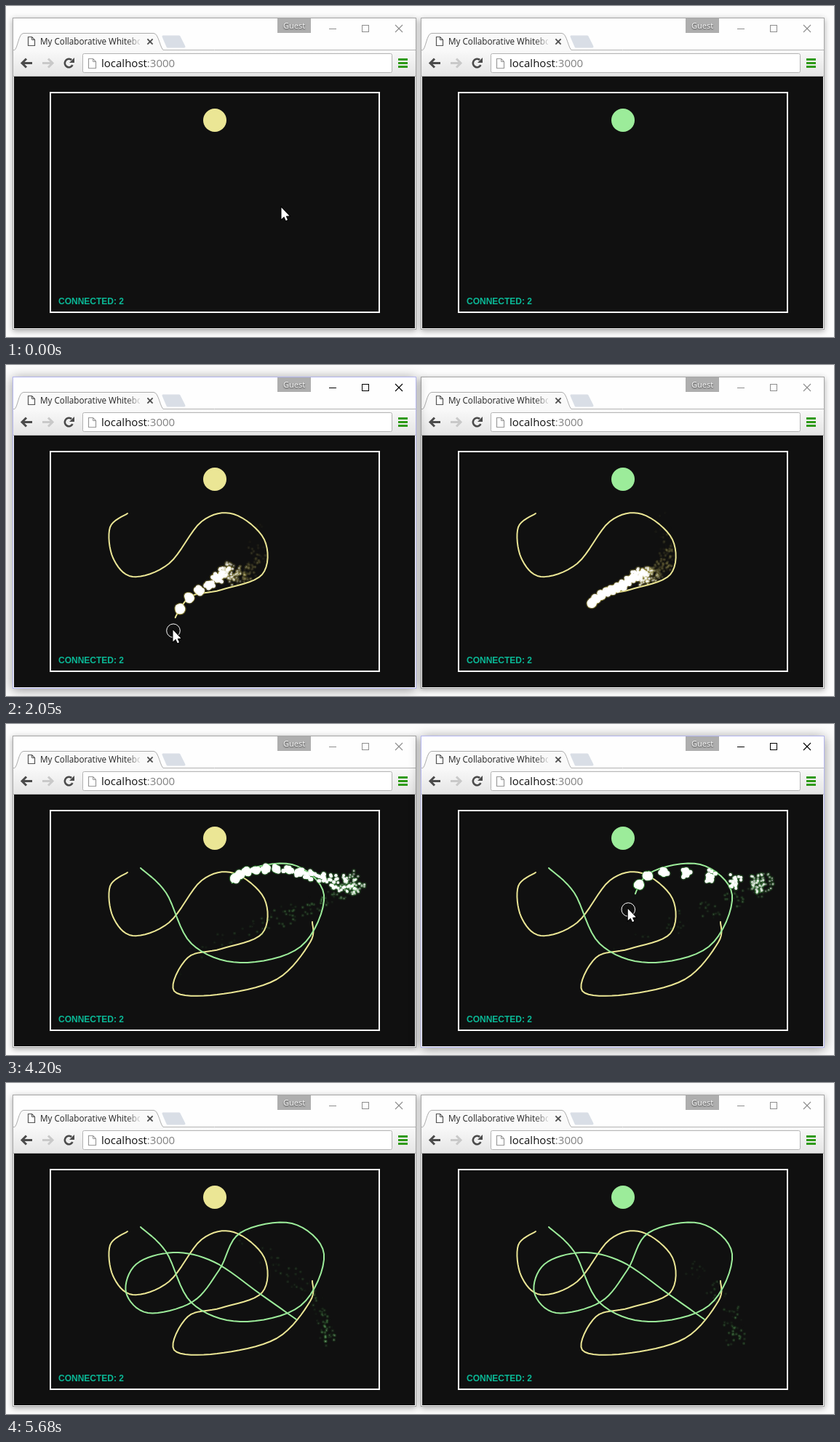
An HTML page with a canvas for the animation above (5.78 s loop, 1138 px wide and 455 px high).

```html
<!DOCTYPE html>
<html lang="en">
<head>
<meta charset="utf-8">
<title>Collaborative whiteboard</title>
<style>
html, body { margin: 0; width: 100%; height: 100%; overflow: hidden; background: #fcfcfc; }
canvas { display: block; }
</style>
</head>
<body>
<canvas id="stage" width="1138" height="455"></canvas>
<script>
const ctx = document.getElementById('stage').getContext('2d');
const LOOP = 5780, SHIFT = 561, TAU = Math.PI * 2;
const UI_FONT = '"Open Sans", "Noto Sans", sans-serif';

const clamp = (v, lo, hi) => Math.min(hi, Math.max(lo, v));
const mix = (a, b, k) => a + (b - a) * k;
const ease = k => k * k * (3 - 2 * k);

// The pointer passes one knot of the spline per beat (ms).
const strokes = [
  {
    owner: 0, color: '#ebe695', glow: '#b9ad4a',
    start: 640, beat: 129, wind: -20, reach: 38,
    knots: [[167, 204], [143, 223], [147, 265], [174, 291], [224, 273], [269, 215], [313, 205],
      [355, 240], [352, 288], [296, 309], [250, 321], [231, 367], [290, 372], [372, 351],
      [418, 300], [421, 272]]
  },
  {
    owner: 1, color: '#9cec9a', glow: '#43a443',
    start: 3190, beat: 127, wind: -10, reach: 50,
    knots: [[185, 198], [220, 232], [255, 302], [322, 328], [405, 306], [437, 235], [393, 193],
      [322, 206], [293, 257], [256, 301], [195, 316], [165, 288], [179, 249], [230, 233],
      [286, 246], [348, 289], [399, 325]]
  }
];
for (const s of strokes) {
  s.last = s.knots.length - 1;
  s.end = s.start + s.last * s.beat;
}

const progress = (s, t) => clamp((t - s.start) / s.beat, 0, s.last);

// Catmull-Rom spline through the knots.
function pointAt(s, u) {
  const i = Math.min(Math.floor(u), s.last - 1), k = u - i;
  const [a, b, c, d] = [-1, 0, 1, 2].map(n => s.knots[clamp(i + n, 0, s.last)]);
  return [0, 1].map(n => b[n] + 0.5 * k * (c[n] - a[n] +
    k * (2 * a[n] - 5 * b[n] + 4 * c[n] - d[n] + k * (3 * (b[n] - c[n]) + d[n] - a[n]))));
}

function rand(seed) {
  const v = Math.sin(seed * 12.9898 + 4.137) * 43758.5453;
  return v - Math.floor(v);
}

function path(points, close) {
  ctx.beginPath();
  points.forEach(([x, y], i) => i ? ctx.lineTo(x, y) : ctx.moveTo(x, y));
  if (close) ctx.closePath();
}

function outline(color, width, fill) {
  if (fill) {
    ctx.fillStyle = fill;
    ctx.fill();
  }
  ctx.strokeStyle = color;
  ctx.lineWidth = width;
  ctx.stroke();
}

function line(points, color, width) {
  path(points);
  outline(color, width);
}

function rect(x, y, w, h, color) {
  ctx.fillStyle = color;
  ctx.fillRect(x, y, w, h);
}

function disc(x, y, r, color) {
  ctx.beginPath();
  ctx.arc(x, y, r, 0, TAU);
  ctx.fillStyle = color;
  ctx.fill();
}

function text(str, x, y, font, color) {
  ctx.font = font;
  ctx.fillStyle = color;
  ctx.fillText(str, x, y);
}

function shadow(color, blur, dy) {
  ctx.shadowColor = color;
  ctx.shadowBlur = blur;
  ctx.shadowOffsetY = dy;
}
const noShadow = () => shadow('transparent', 0, 0);

function cross(x, y, r, color, width) {
  line([[x - r, y - r], [x + r, y + r]], color, width);
  line([[x + r, y - r], [x - r, y + r]], color, width);
}

function pageIcon(x, y, w, h, color) {
  const f = 4;
  path([[x, y], [x + w - f, y], [x + w, y + f], [x + w, y + h], [x, y + h]], true);
  outline(color, 1.2, '#fff');
  line([[x + w - f, y], [x + w - f, y + f], [x + w, y + f]], color, 1);
}

function navArrow(x, y, dir, color) {
  line([[x - 6 * dir, y], [x + 8 * dir, y]], color, 3);
  line([[x, y - 6], [x - 6 * dir, y], [x, y + 6]], color, 3);
}

function titleBar(active) {
  const ink = active ? '#000' : '#8e8e8e';
  rect(373, 17, 46, 20, '#aeaeae');
  shadow('rgba(0,0,0,.75)', 2, 1);
  text('Guest', 381, 31, '11px ' + UI_FONT, '#fff');
  noShadow();

  line([[444, 31.5], [454, 31.5]], ink, 1);
  ctx.strokeRect(489.5, 26.5, 9, 9);
  cross(540, 31, 5, ink, 1.1);

  line([[10, 60.5], [563, 60.5]], '#b4b4b4', 1);
  ctx.beginPath();
  ctx.moveTo(11, 61);
  ctx.bezierCurveTo(16, 60, 17, 37.5, 24, 37.5);
  ctx.lineTo(203, 37.5);
  ctx.bezierCurveTo(210, 37.5, 212, 60, 217, 61);
  outline('#acacac', 1, '#f9f9f9');

  pageIcon(30.5, 42.5, 9, 12, '#555');
  const fade = ctx.createLinearGradient(165, 0, 185, 0);
  fade.addColorStop(0, '#222');
  fade.addColorStop(1, 'rgba(34,34,34,.1)');
  ctx.save();
  ctx.beginPath();
  ctx.rect(46, 38, 138, 20);
  ctx.clip();
  text('My Collaborative Whiteboard', 47, 53, '11.7px ' + UI_FONT, fade);
  ctx.restore();
  cross(198, 49, 3.6, '#4d4d4d', 1.8);

  path([[216, 42], [238, 42], [245, 56], [222, 56]], true);
  ctx.lineJoin = 'round';
  outline('#d9dee6', 3, '#d9dee6');
  ctx.lineJoin = 'miter';
}

function toolBar() {
  const shade = ctx.createLinearGradient(0, 61, 0, 96);
  shade.addColorStop(0, '#f9f9f9');
  shade.addColorStop(1, '#e5e5e5');
  rect(10, 61, 553, 36, shade);
  rect(10, 96, 553, 1, '#b8b8b8');

  const dark = '#4b4b4b';
  navArrow(28, 78.5, 1, dark);
  navArrow(58, 78.5, -1, '#c9c9c9');
  ctx.beginPath();
  ctx.arc(86.5, 78.5, 5.7, 0.5, 5.4);
  outline(dark, 2.6);
  path([[94, 71], [94, 78], [87, 78]], true);
  ctx.fillStyle = dark;
  ctx.fill();

  ctx.beginPath();
  ctx.roundRect(105.5, 65.5, 425, 26, 2);
  outline('#b3b3b3', 1, '#fff');
  pageIcon(113.5, 72.5, 10, 13, '#9a9a9a');
  text('localhost', 131, 84, '15px ' + UI_FONT, '#111');
  text(':3000', 131 + ctx.measureText('localhost').width, 84, ctx.font, '#808080');
  for (let y = 72; y < 85; y += 5) rect(539, y, 13, 3, '#2f9a17');
}

// Puffs leave the tip slowly, speed up along a turning wind and break into specks.
function sparks(s, win, t, lag) {
  const own = win === s.owner;
  const step = own ? 1 / 3 : 1 / 6, count = own ? 26 : 16;
  const dots = [];
  for (let n = 0; n * step <= s.last; n++) {
    const u = n * step, age = t - lag - s.start - u * s.beat;
    if (age < 0 || age > 620) continue;
    const [x, y] = pointAt(s, u);
    const size = 0.6 + 4 * Math.max(0, 1 - age / 390);
    const drift = s.reach * clamp(age / 300, 0, 1) ** 2;
    for (let k = 0; k < count; k++) {
      const seed = n * 67 + k * 5.3 + win * 911;
      const fade = Math.min(1, (400 + 220 * rand(seed) - age) / 220);
      if (fade <= 0) continue;
      const turn = (s.wind + 70 * u + 30 * (rand(seed + 1) - 0.5)) / 360 * TAU;
      const far = drift * (0.8 + 0.4 * rand(seed + 2));
      const spin = rand(seed + 3) * TAU;
      const off = (2.8 + age / 150) * Math.sqrt(rand(seed + 4));
      dots.push([x + far * Math.cos(turn) + off * Math.cos(spin),
        y + far * Math.sin(turn) + off * Math.sin(spin), size, fade]);
    }
  }
  for (const [x, y, r, fade] of dots) {
    ctx.globalAlpha = fade * 0.25;
    disc(x, y, r + 1.5, s.glow);
  }
  for (const [x, y, r, fade] of dots) {
    ctx.globalAlpha = fade * clamp(r / 2.2, 0.3, 1);
    disc(x, y, r, '#fff');
  }
  ctx.globalAlpha = 1;
}

function trail(s, t) {
  const u = progress(s, t), points = [];
  for (let v = 0; v < u; v += 0.125) points.push(pointAt(s, v));
  points.push(pointAt(s, u));
  line(points, s.color, 2);
}

function board(win, t) {
  rect(11, 97, 551, 346, '#101010');
  ctx.strokeStyle = '#fff';
  ctx.lineWidth = 2;
  ctx.strokeRect(61, 119, 452, 302);
  disc(287, 157, 16, strokes[win].color);
  text('CONNECTED: 2', 72, 410, 'bold 12px "Liberation Sans", Arial, sans-serif', '#0ab896');

  ctx.save();
  ctx.beginPath();
  ctx.rect(60, 118, 454, 306);
  ctx.clip();
  ctx.lineJoin = ctx.lineCap = 'round';
  const lag = s => win === s.owner ? 50 : 85;
  for (const s of strokes) if (t - lag(s) > s.start) trail(s, t - lag(s));
  for (const s of strokes) sparks(s, win, t, lag(s));
  ctx.restore();
}

function browser(win, active, t) {
  ctx.save();
  ctx.translate(win * SHIFT, 0);
  shadow(`rgba(0,0,0,${active ? 0.42 : 0.32})`, active ? 15 : 8, 2);
  rect(9, 16, 555, 429, active ? '#b3b5ee' : '#a6a6a6');
  noShadow();
  rect(10, 17, 553, 427, '#fefefe');
  titleBar(active);
  toolBar();
  board(win, t);
  ctx.restore();
}

function onStage(s, t) {
  const [x, y] = pointAt(s, progress(s, t));
  return [x + s.owner * SHIFT, y];
}

// Eased pointer travel while no stroke is being drawn.
const [one, two] = strokes;
const moves = [
  { until: one.start, from: 100, to: 620, a: [379, 278], b: onStage(one, 0) },
  { until: two.start, from: 2620, to: 3010, a: onStage(one, LOOP), b: onStage(two, 0) },
  { until: LOOP, from: 5240, to: 5420, a: onStage(two, LOOP), b: [1117, 462] }
];

function arrow(x, y) {
  ctx.save();
  ctx.translate(x - 0.5, y - 1);
  path([[0, 0], [0, 16], [3.7, 12.6], [6.2, 18], [8.5, 17], [6.2, 11.8], [11, 11.5]], true);
  outline('#000', 2);
  ctx.fillStyle = '#fff';
  ctx.fill();
  ctx.restore();
}

function pointer(t) {
  const pressed = strokes.find(s => t >= s.start && t <= s.end + 20);
  if (pressed) {
    const [x, y] = onStage(pressed, t);
    ctx.beginPath();
    ctx.arc(x, y, 9.3, 0, TAU);
    outline('#fff', 1);
    arrow(x, y);
    return;
  }
  const m = moves.find(m => t < m.until);
  const k = ease(clamp((t - m.from) / (m.to - m.from), 0, 1));
  arrow(mix(m.a[0], m.b[0], k), mix(m.a[1], m.b[1], k));
}

function draw(t) {
  const active = t < one.start || t >= 5430 ? -1 : t < two.start ? 0 : 1;
  rect(0, 0, 1138, 455, '#fcfcfc');
  for (const win of active === 0 ? [1, 0] : [0, 1]) browser(win, win === active, t);
  pointer(t);
}

const began = performance.now();
function tick() {
  draw((performance.now() - began) % LOOP);
  requestAnimationFrame(tick);
}
tick();
</script>
</body>
</html>
```
